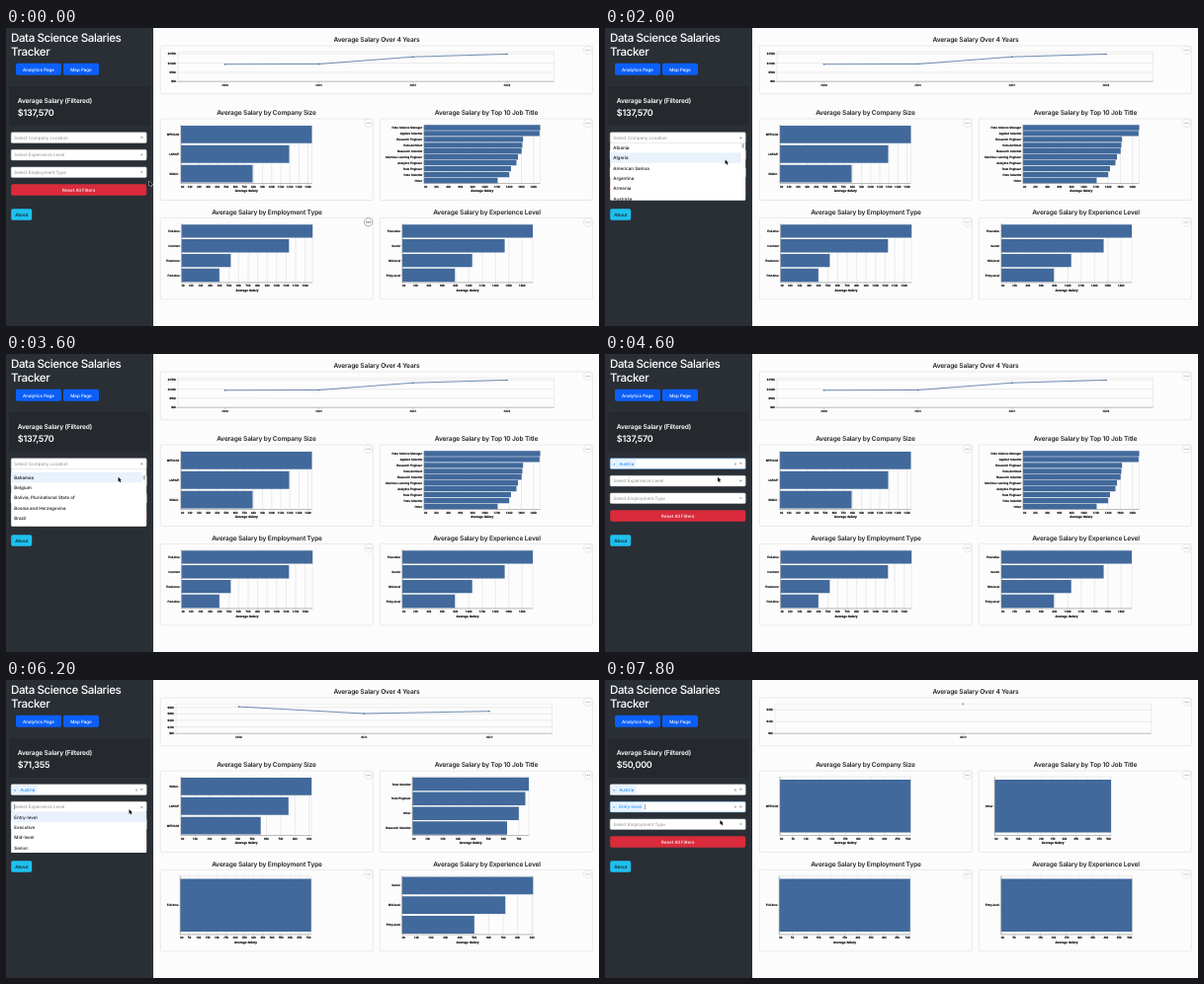
An HTML page with a canvas that plays this animation: 600x302 px, repeating every 8 s.

```html
<!DOCTYPE html>
<html lang="en">
<head>
<meta charset="utf-8">
<title>Data Science Salaries Tracker</title>
<style>
html, body { margin: 0; width: 100%; height: 100%; overflow: hidden; background: #fcfcfc; }
canvas { display: block; width: 600px; height: 302px; }
</style>
</head>
<body>
<canvas id="stage"></canvas>
<script>
const W = 600, H = 302, LOOP = 8000, STEP = 200;
const UI = 'Inter, sans-serif', PLOT = '"Liberation Sans", Arial, sans-serif';
const BAR = '#41699b', INK = '#212529';
const ROW = 10.33, PLOT_H = 59.5;

const canvas = document.getElementById('stage');
const ctx = canvas.getContext('2d');
const dpr = window.devicePixelRatio || 1;
canvas.width = W * dpr;
canvas.height = H * dpr;
ctx.textRendering = 'geometricPrecision';

const countries = ['Albania', 'Algeria', 'American Samoa', 'Argentina', 'Armenia', 'Australia', 'Austria',
  'Bahamas', 'Belgium', 'Bolivia, Plurinational State of', 'Bosnia and Herzegovina', 'Brazil', 'Canada', 'China'];
const levels = ['Entry-level', 'Executive', 'Mid-level', 'Senior'];

// Each bar chart: left edge, plot width, largest value and tick step (thousands), then label/value pairs.
const views = [
  {
    salary: '$137,570',
    line: { x: 174, max: 161, tick: 50, years: [2020, 2021, 2022, 2023], values: [93.5, 95, 134, 149] },
    size: { x: 177, w: 132.5, max: 144.3, tick: 10, bars: [['MEDIUM', 144.3], ['LARGE', 119.3], ['SMALL', 79]] },
    job: { x: 423, w: 117.5, max: 191, tick: 20, bars: [['Data Science Manager', 191], ['Applied Scientist', 190],
      ['Research Engineer', 162.8], ['Data Architect', 161.7], ['Research Scientist', 160.5],
      ['Machine Learning Engineer', 154.5], ['Analytics Engineer', 152], ['Data Engineer', 143],
      ['Data Scientist', 140], ['Other', 121]] },
    type: { x: 177.7, w: 132.5, max: 137.8, tick: 10, bars: [['Full-time', 137.8], ['Contract', 113],
      ['Freelance', 51.7], ['Part-time', 39.7]] },
    level: { x: 401, w: 132, max: 196, tick: 20, bars: [['Executive', 196], ['Senior', 153.8],
      ['Mid-level', 105], ['Entry-level', 79]] }
  },
  {
    salary: '$71,355',
    line: { x: 172, max: 90.6, tick: 20, years: [2020, 2021, 2022], values: [82, 61, 68] },
    size: { x: 177, w: 132.2, max: 91.7, tick: 10, bars: [['SMALL', 91.7], ['LARGE', 75.5], ['MEDIUM', 56]] },
    job: { x: 411.3, w: 117.7, max: 76.6, tick: 10, bars: [['Data Scientist', 76.6], ['Data Engineer', 74.3],
      ['Other', 70], ['Research Scientist', 62.3]] },
    type: { x: 176.3, w: 132.5, max: 71.4, tick: 5, bars: [['Full-time', 71.4]] },
    level: { x: 400.8, w: 132.5, max: 90.7, tick: 10, bars: [['Senior', 90.7], ['Mid-level', 71.5], ['Entry-level', 50]] }
  },
  {
    salary: '$50,000',
    line: { x: 172, max: 50, tick: 20, years: [2022], values: [50] },
    size: { x: 177, w: 132.2, max: 50, tick: 5, bars: [['MEDIUM', 50]] },
    job: { x: 394.3, w: 117.7, max: 50, tick: 5, bars: [['Other', 50]] },
    type: { x: 176.3, w: 132.5, max: 50, tick: 5, bars: [['Full-time', 50]] },
    level: { x: 400.8, w: 132.5, max: 50, tick: 5, bars: [['Entry-level', 50]] }
  }
];

const pointerPath = [[0, 145, 155.3], [800, 126, 113], [1200, 125.5, 112], [1400, 125.5, 113], [2400, 119.5, 144.5],
  [2800, 119.5, 144.5], [3400, 113.5, 124.8], [4600, 114, 124.8], [5400, 125, 129.8], [6000, 125.3, 130],
  [7000, 118, 140], [7200, 118, 140], [7600, 116.5, 142]];
const scrollPath = [[0, 0], [2400, 0], [2600, 9], [3400, 68.5], [3600, 68.5], [4200, 58]];

function along(path, t) {
  let i = path.length - 1;
  while (path[i][0] > t) i--;
  const a = path[i], b = path[i + 1];
  if (!b) return a.slice(1);
  const u = (t - a[0]) / (b[0] - a[0]), e = u * u * (3 - 2 * u);
  return a.slice(1).map((v, k) => v + (b[k + 1] - v) * e);
}

// y is the middle of the capital letters.
function text(s, x, y, size, { color = INK, align = 'left', weight = 400, font = UI, gap = 0 } = {}) {
  ctx.font = `${weight} ${size}px ${font}`;
  ctx.letterSpacing = gap + 'px';
  ctx.textAlign = align;
  ctx.fillStyle = color;
  ctx.fillText(s, x, y + size * 0.36);
}

// Tiny chart lettering, thickened slightly to stay legible.
function plotText(s, x, y, align, size = 3, weight = 400) {
  text(s, x, y, size, { font: PLOT, color: '#000', align, weight });
  ctx.strokeStyle = '#000';
  ctx.lineWidth = 0.15;
  ctx.strokeText(s, x, y + size * 0.36);
}

function box(x, y, w, h, fill, r = 0, stroke, lw = 0.5) {
  ctx.beginPath();
  ctx.roundRect(x, y, w, h, r);
  if (fill) { ctx.fillStyle = fill; ctx.fill(); }
  if (stroke) { ctx.strokeStyle = stroke; ctx.lineWidth = lw; ctx.stroke(); }
}

function stroke(points, color, lw) {
  ctx.beginPath();
  points.forEach(([x, y]) => ctx.lineTo(x, y));
  ctx.strokeStyle = color;
  ctx.lineWidth = lw;
  ctx.stroke();
}

function heading(s, x, y, align = 'center', color = INK) {
  text(s, x, y, 6.6, { weight: 600, align, color, gap: -0.15 });
}

function dots(x, y, active) {
  ctx.beginPath();
  ctx.arc(x, y, 4.2, 0, 7);
  ctx.strokeStyle = active ? '#777' : '#dcdcdc';
  ctx.lineWidth = 0.6;
  ctx.stroke();
  for (let i = -1; i <= 1; i++) {
    ctx.beginPath();
    ctx.arc(x + i * 1.7, y, 0.65, 0, 7);
    ctx.fillStyle = active ? '#333' : '#b8b8b8';
    ctx.fill();
  }
}

function panel(x, y, w, h, active) {
  box(x, y, w, h, '#fcfcfc', 1, '#dedede', 0.6);
  dots(x + w - 4.7, y + 4.4, active);
}

function lineChart({ x, max, tick, years, values }) {
  const top = 24.2, bottom = 54.2, w = 380.5;
  const yAt = v => bottom - v / max * (bottom - top);
  box(x, top, w, bottom - top, null, 0, '#ddd');
  for (let v = 0; v <= max; v += tick) {
    stroke([[x - 1.5, yAt(v)], [x + w, yAt(v)]], v ? '#d8d8d8' : '#888', 0.5);
    plotText(`$${v}k`, x - 2, yAt(v), 'right');
  }
  const pts = values.map((v, i) => [x + w * (i + 0.5) / years.length, yAt(v)]);
  stroke(pts, BAR, 0.75);
  pts.forEach(([px, py], i) => {
    ctx.beginPath();
    ctx.arc(px, py, 0.8, 0, 7);
    ctx.fillStyle = BAR;
    ctx.fill();
    stroke([[px, bottom], [px, bottom + 1.5]], '#888', 0.4);
    plotText(years[i], px, 58.2, 'center');
  });
}

function barChart({ x, w, max, tick, bars }, y) {
  const bottom = y + PLOT_H, band = PLOT_H / bars.length;
  box(x, y, w, PLOT_H, null, 0, '#ddd');
  for (let v = 0; v <= max; v += tick) {
    const tx = x + v / max * w;
    stroke([[tx, y], [tx, bottom + 1.5]], '#d8d8d8', 0.5);
    plotText(v + 'k', tx, bottom + 3.2, v === 0 ? 'left' : v === max ? 'right' : 'center');
  }
  stroke([[x, bottom], [x + w, bottom]], '#888', 0.5);
  bars.forEach(([name, v], i) => {
    box(x, y + band * (i + 0.05), v / max * w, band * 0.9, BAR);
    const cy = y + band * (i + 0.5);
    stroke([[x - 1.5, cy], [x, cy]], '#888', 0.4);
    plotText(name, x - 2, cy, 'right');
  });
  stroke([[x, y], [x, bottom]], '#888', 0.5);
  plotText('Average Salary', x + w / 2, bottom + 7.6, 'center', 3.2, 700);
}

function charts(view, hotMenu) {
  heading('Average Salary Over 4 Years', 375, 11.9);
  panel(156.3, 18, 437, 48.7);
  lineChart(view.line);
  const grid = [
    ['Average Salary by Company Size', view.size, 156.3, 263.5, 92],
    ['Average Salary by Top 10 Job Title', view.job, 378.3, 486, 92],
    ['Average Salary by Employment Type', view.type, 156.3, 264, 192.4],
    ['Average Salary by Experience Level', view.level, 378.3, 486.5, 192.4]
  ];
  grid.forEach(([title, data, x, mid, y]) => {
    heading(title, mid, y - 6);
    panel(x, y, 215, 82.5, hotMenu && data === view.type);
    barChart(data, y + 6);
  });
}

function button(s, x, y, w, h, fill, color = '#fff') {
  box(x, y, w, h, fill, 1.7);
  text(s, x + w / 2, y + h / 2 + 0.2, 4.5, { color, align: 'center', weight: 500 });
}

function arrow(x, y, up) {
  const d = up ? -1 : 1;
  ctx.beginPath();
  ctx.moveTo(x - 1.6, y - 0.8 * d);
  ctx.lineTo(x + 1.6, y - 0.8 * d);
  ctx.lineTo(x, y + 0.9 * d);
  ctx.fillStyle = '#999';
  ctx.fill();
}

function select(y, hint, { chip, open, focus, caret } = {}) {
  const mid = y + 5.3;
  box(5.2, y, 137, 10.6, '#fff', 1.2, focus && !open ? '#5aa5f5' : '#ccc');
  let caretX = 8.4;
  if (chip) {
    ctx.font = `400 4.5px ${UI}`;
    ctx.letterSpacing = '0px';
    const w = ctx.measureText(chip).width + 9;
    box(6.8, y + 1.6, w, 7.4, '#ebf5ff', 0.6, '#c2e0ff', 0.4);
    stroke([[11.7, y + 1.6], [11.7, y + 9]], '#c2e0ff', 0.4);
    text('×', 9.3, mid, 4.5, { color: '#007eff', align: 'center' });
    text(chip, 14.2, mid, 4.5, { color: '#007eff' });
    text('×', 131.8, mid, 5, { color: '#777', align: 'center' });
    caretX = 6.8 + w + 2;
  } else {
    text(hint, 8.3, mid, 4.5, { color: '#8c8c8c' });
  }
  if (caret) stroke([[caretX, mid - 2.7], [caretX, mid + 2.7]], '#333', 0.5);
  arrow(137.3, mid, open);
}

function menu(y, h, items, hover, scroll, thumb) {
  box(5.2, y, 137, h, '#fff', [0, 0, 1.2, 1.2]);
  ctx.save();
  ctx.beginPath();
  ctx.rect(5.2, y, 137, h);
  ctx.clip();
  items.forEach((s, i) => {
    const top = y + i * ROW - scroll;
    if (i === hover) box(5.2, top, thumb ? 132.5 : 137, ROW, '#e8f1fc');
    text(s, 8.3, top + ROW / 2, 4.5, { color: '#111', weight: 500 });
  });
  ctx.restore();
  if (thumb) box(138.5, y + 0.7 + scroll * 0.085, 2.6, 4.8, '#c1c1c1', 1.3);
}

function sidebar(t, view) {
  const place = t >= 4600, placeOpen = t >= 1000 && !place;
  const rank = t >= 7200, rankOpen = t >= 6000 && !rank;
  box(0, 0, 149, H, '#2a2f35');
  const title = { color: '#fff', weight: 500, gap: -0.42 };
  text('Data Science Salaries', 5, 9.8, 11.6, title);
  text('Tracker', 5, 23.7, 11.6, title);
  button('Analytics Page', 10, 35.7, 46, 12, '#0b5ff8');
  button('Map Page', 58, 35.7, 36, 12, '#0b5ff8');
  box(3, 59, 142.5, 40, '#25292e', 2);
  heading('Average Salary (Filtered)', 11.8, 73.5, 'left', '#fff');
  text(view.salary, 11.8, 86.1, 9, { color: '#fff', weight: 600, gap: -0.25 });

  select(105.8, 'Select Company Location',
    { chip: place && 'Austria', open: placeOpen, focus: t >= 1000 && t < 6000 });
  select(123.3, 'Select Experience Level',
    { chip: rank && 'Entry-level', open: rankOpen, focus: t >= 6000, caret: t >= 6000 });
  select(140.9, 'Select Employment Type');
  button('Reset All Filters', 5.2, 158.2, 137, 11.6, '#d92b3c');
  button('About', 5.2, 183.2, 21, 11.6, '#1fc0ee', '#111');

  const y = along(pointerPath, t)[1];
  if (placeOpen) {
    // The hovered row trails the scroll by one step.
    const [before] = along(scrollPath, Math.max(0, t - STEP)), [scroll] = along(scrollPath, t);
    menu(116.2, 58.6, countries, Math.max(0, Math.floor((y - 116 + before) / ROW)), scroll, true);
  }
  if (rankOpen) menu(133.8, ROW * 4, levels, Math.max(0, Math.floor((y - 133.8) / ROW)), 0, false);
}

function pointer([x, y]) {
  const shape = [[0, 0], [0, 4.6], [1.1, 3.7], [1.9, 5.4], [2.7, 5], [1.9, 3.4], [3.3, 3.3]];
  ctx.beginPath();
  shape.forEach(([dx, dy]) => ctx.lineTo(x + dx, y + dy));
  ctx.closePath();
  ctx.lineWidth = 0.8;
  ctx.strokeStyle = '#fff';
  ctx.stroke();
  ctx.fillStyle = '#000';
  ctx.fill();
}

function draw(now) {
  const t = Math.floor(now % LOOP / STEP) * STEP;
  const view = views[t < 4800 ? 0 : t < 7400 ? 1 : 2];
  ctx.setTransform(dpr, 0, 0, dpr, 0, 0);
  box(0, 0, W, H, '#fcfcfc');
  charts(view, t < STEP);
  sidebar(t, view);
  pointer(along(pointerPath, t));
}

const start = performance.now();
function frame() {
  draw(performance.now() - start);
  requestAnimationFrame(frame);
}
frame();
</script>
</body>
</html>
```
